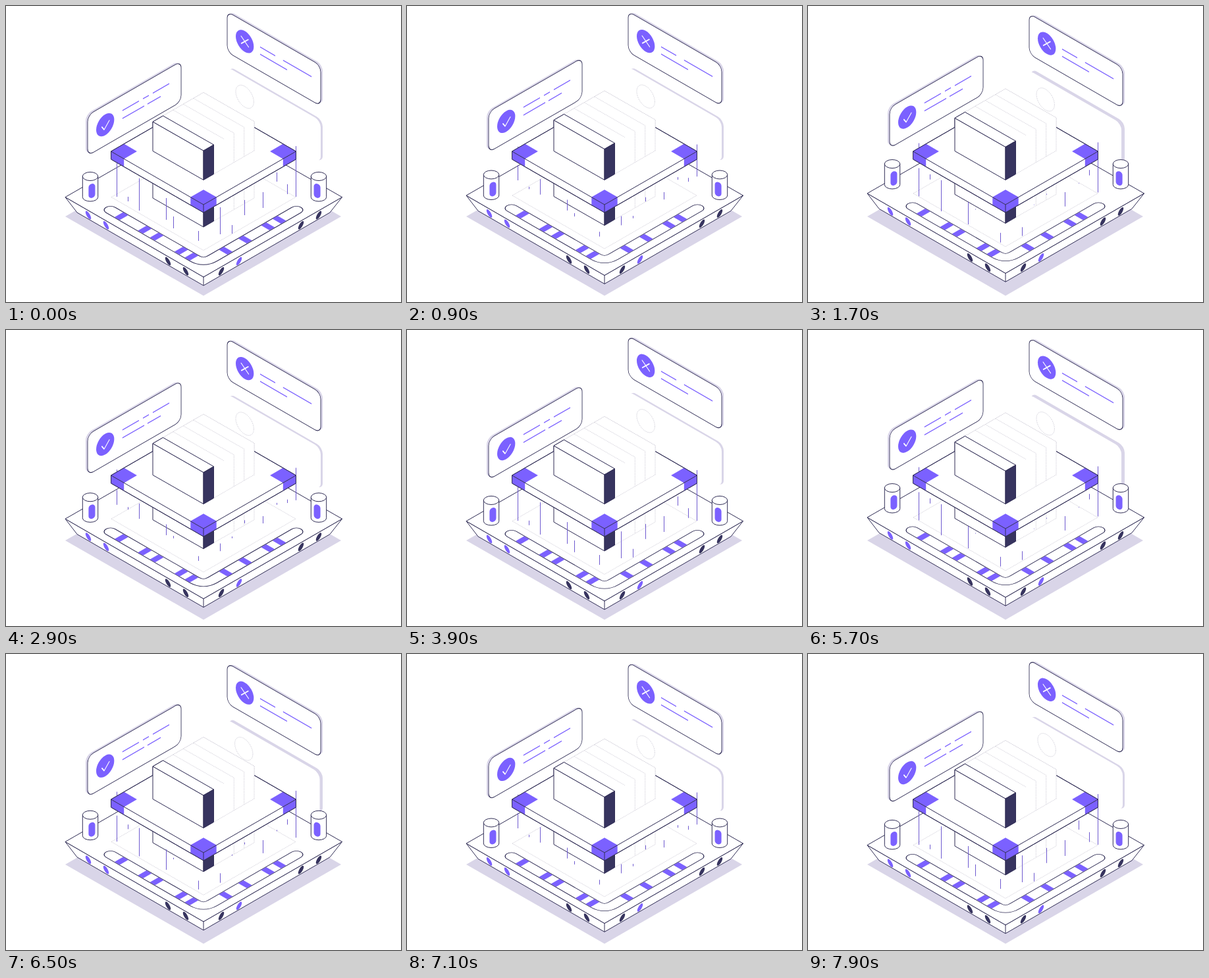
An HTML page for the animation above (8 s loop, 600 px wide and 450 px high).

```html
<!DOCTYPE html>
<html lang="en">
<head>
<meta charset="utf-8">
<title>Isometric platform</title>
<style>
  html, body { margin: 0; width: 100%; height: 100%; overflow: hidden; background: #fff; }
  svg { display: block; width: 100%; height: 100%; }
  .ink { stroke: #302d55; stroke-width: 1; stroke-linejoin: round; }
  .w { fill: #fff; }
  .p { fill: #7b61ff; }
  .d { fill: #37345f; }
  .lilac { fill: #d9d5e8; }
  .none { fill: none; }
  .bar { stroke: #7b61ff; stroke-width: 1.5; fill: none; }
  .beam { stroke: #6f5bd0; stroke-width: 1; }
  .mark { stroke: #fff; stroke-width: 1.5; fill: none; stroke-linecap: round; stroke-linejoin: round; }
  .faint { stroke: #c4c2cf; stroke-width: .7; stroke-dasharray: 1.5 1; }
</style>
</head>
<body>
<svg id="stage" viewBox="0 0 600 450" xmlns="http://www.w3.org/2000/svg"></svg>
<script>
const PERIOD = 4000, STEP = 100;

const path = (d, cls, extra = '') => `<path d="${d}" class="${cls}" ${extra}/>`;
const group = (id, body, extra = '') => `<g id="${id}" ${extra}>${body}</g>`;
const at = (x, y, body) => `<g transform="translate(${x} ${y})">${body}</g>`;
const rect = (x, y, w, h, cls, r = 0) =>
  `<rect x="${x}" y="${y}" width="${w}" height="${h}" rx="${r}" class="${cls}"/>`;

// Upright panel in isometric view; side is -1 (rising) or 1 (falling)
const panel = (x, y, side, body) =>
  `<g transform="matrix(.866 ${side * .5} 0 1 ${x} ${y})">${body}</g>`;
const face = (cls, h = 61.5) => rect(0, 0, 164, h, cls, 10);
const disc = cls => `<circle cx="30.8" cy="30" r="15.8" class="${cls}"/>`;

function card(x, y, side, bars, mark) {
  return panel(x + side * 3.1, y - 1.2, side, face('lilac')) +
    panel(x, y, side, face('w ink') + disc('p') + path(bars, 'bar') + path(mark, 'mark'));
}

function slot(x, y, turn, cls) {
  return `<ellipse rx="2.6" ry="7.2" class="${cls}" transform="translate(${x} ${y}) rotate(${turn})"/>`;
}

function track() {
  const d = 'M-62 101H85Q101 101 101 85V-62';
  const cap = 'fill="none" stroke-linecap="round"';
  const stripes = [-43, -2, 19, 62, 80].map(a => rect(a - 4.5, 93.5, 9, 15, 'p')).join('') +
    [62, 28, -12, -32].map(b => rect(93.5, b - 4.5, 15, 9, 'p')).join('');
  return `<g transform="matrix(.866 .5 -.866 .5 300 290.6)">` +
    path(d, '', cap + ' stroke="#302d55" stroke-width="17.1"') +
    path(d, '', cap + ' stroke="#fff" stroke-width="14.9"') + stripes + '</g>';
}

function base() {
  return path('M90 290.6L108 314L300 425L492 314L510.5 290.6L300 412Z', 'w ink') +
    path('M90 290.6L300 170L510.5 290.6L300 412ZM300 412V425', 'w ink') +
    slot(125, 318, -30, 'p') + slot(152, 333.3, -30, 'p') +
    slot(246, 388, -30, 'd') + slot(273, 403.3, -30, 'd') +
    slot(327, 403.3, 30, 'd') + slot(354, 388, 30, 'p') +
    slot(448, 333.3, 30, 'd') + slot(475, 318, 30, 'd') +
    track() +
    path('M160 290.6L300 210L440 290.6L300 371.5Z', 'none faint');
}

function stack() {
  const seams = [1, 2, 3].map(i => {
    const x = 15.4 * i, y = -8.9 * i;
    return path(`M${238.5 + x} ${167 + y}l77 44${i > 1 ? 'v116' : ''}`, 'none faint');
  }).join('');
  return path('M238.5 167L300 131.5L377 175.5V292L315.5 327V211Z', 'w faint') + seams +
    path('M223 176L300 220V336L223 292Z', 'w ink') +
    path('M223 176L238.5 167L315.5 211L300 220Z', 'w ink') +
    path('M300 220L315.5 211V327L300 336Z', 'd ink');
}

function deck() {
  const tile = (x, y) => path(`M${x - 19.7} ${y}l19.7 -11.4l19.7 11.4l-19.7 11.4Z`, 'p');
  const edge = (x, y, dy) => path(`M${x} ${y}l19.7 ${dy}v12l-19.7 ${-dy}Z`, 'p');
  return path('M159.5 221L300 140L440.5 221V233L300 314L159.5 233Z', 'w ink') +
    tile(179.2, 221) + tile(420.8, 221) + tile(300, 290.6) +
    edge(159.5, 221, 11.4) + edge(280.3, 290.6, 11.4) +
    edge(300, 302, -11.4) + edge(420.8, 232.4, -11.4) +
    path('M159.5 221L300 302L440.5 221M300 302V314', 'none ink') +
    path('M159.5 221L300 140L440.5 221V233L300 314L159.5 233Z', 'none ink');
}

function post(x, side) {
  return at(x, 259,
    path('M-11.7 0V31.5A11.7 6.5 0 0 0 11.7 31.5V0', 'w ink') +
    '<ellipse rx="11.7" ry="6.5" class="w ink"/>' +
    `<g transform="matrix(1 ${side * .2} 0 1 ${-side * 2.4} 22)">` +
    rect(-5, -10.8, 10, 21.6, 'p', 4.8) + '</g>');
}

// x, then top and bottom when low, then top and bottom when high
const BEAMS = [
  [168, 238, 290, 247, 290], [168, 218, 236, 208, 236], [185, 290, 297, 254, 262],
  [202, 262, 311, 265, 313], [243, 292, 325, 298, 333], [254, 320, 338, 308, 308],
  [292, 342, 357, 345, 360], [325, 306, 347, 338, 350], [343, 333, 346, 300, 300],
  [362, 295, 318, 285, 285], [390, 283, 307, 283, 305], [411, 253, 267, 270, 270],
  [427, 271, 286, 248, 256], [440, 213, 232, 207, 232], [440, 233, 290, 233, 284]
];

const stage = document.getElementById('stage');
stage.innerHTML =
  '<clipPath id="above"><path d="M200 100H400V220.5H377L300 264.5L223 220.5H200Z"/></clipPath>' +
  path('M90 320L300 199L509 320L300 440.5Z', 'lilac') +
  group('ghost',
    panel(339, 91.2, 1, face('lilac', 64.5)) +
    group('ghostFace', panel(336, 92.2, 1, face('w', 64) + disc('none faint')))) +
  group('base', base() + group('stack', stack())) +
  group('beams', BEAMS.map(b => `<line x1="${b[0]}.5" x2="${b[0]}.5" class="beam"/>`).join('')) +
  deck() +
  `<g clip-path="url(#above)"><use id="top" href="#stack"/></g>` +
  path('M223 220.5L300 264.5L315.5 255.6', 'none ink') +
  path('M315.5 255.6L377 220', 'none faint') +
  group('posts', post(128, -1) + post(475, 1)) +
  group('left', card(124, 166, -1,
    'M61 23.6H90M97 23.6H107.4M114.3 23.6H143.2M61 35.6H99.3M105 35.6H128.2',
    'M25 30.5L29 36.5L38 27')) +
  group('right', card(336, 8.2, 1,
    'M57.7 25H84.3M98 25H148M57.7 36H105',
    'M24.5 25L37.5 35M24.8 36L37 24'));

const el = id => document.getElementById(id);
const move = (id, y, x = 0) => el(id).setAttribute('transform', `translate(${x} ${y.toFixed(2)})`);
const mix = (a, b, k) => a + (b - a) * k;
const beams = [...el('beams').children];

function draw(ms) {
  const t = Math.floor(ms / STEP) * STEP % PERIOD;
  const turn = v => 2 * Math.PI * v / PERIOD;
  const lift = (1 - Math.cos(turn(t))) / 2;
  const sway = 2.5 - 3.1 * Math.cos(turn(t - 500));
  const near = Math.min(1, Math.abs(t - 2000) / 1100);
  const pop = 8 * (1 + Math.cos(Math.PI * near));
  const gap = Math.max(0, Math.min(1, (lift - .6) / .35));
  // Beams shorten midway between the two rest positions
  const reach = 1 - .55 * Math.sin(Math.PI * lift) ** 2;

  move('base', -6 * lift);
  move('top', -6 * lift);
  move('posts', -6 * lift - pop);
  move('left', -12.2 * lift);
  move('right', sway);
  move('ghost', sway);
  move('ghostFace', gap * 1.2, -gap * 2);
  beams.forEach((line, i) => {
    const [, a, b, c, d] = BEAMS[i];
    const y = mix(a, c, lift);
    line.setAttribute('y1', y);
    line.setAttribute('y2', y + mix(b - a, d - c, lift) * reach);
  });
}

const start = performance.now();
function tick(now) {
  draw(Math.max(0, now - start));
  requestAnimationFrame(tick);
}
draw(0);
requestAnimationFrame(tick);
</script>
</body>
</html>
```
